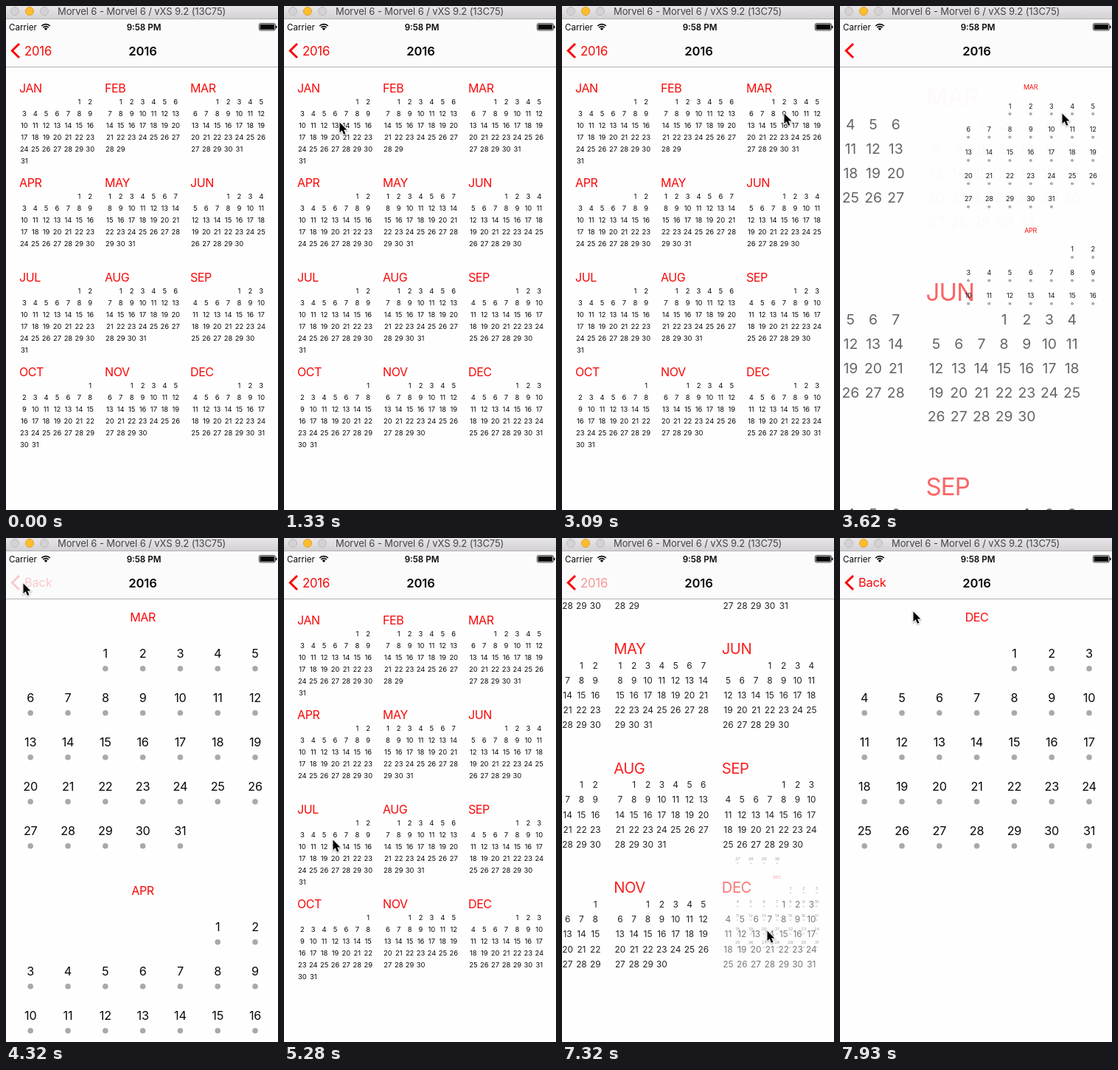
Animation, 369 px wide and 682 px high, one loop 8000 ms. Source, as an HTML page with a canvas:

```html
<!DOCTYPE html>
<html lang="en">
<head>
<meta charset="utf-8">
<title>Year calendar</title>
<style>
  html, body { margin: 0; width: 100%; height: 100%; overflow: hidden; background: #fefefe; }
  canvas { display: block; width: 369px; height: 682px; }
</style>
</head>
<body>
<canvas id="stage"></canvas>
<script>
const W = 369, H = 682, LOOP = 8000, STEP = 87.7, ZOOM = 410, FADE = 200;
const TOP = 18, NAV_BOTTOM = 82;
const RED = '#f80808', INK = '#080808', PAPER = '#fefefe';
const FONT = 'Inter, Roboto, sans-serif';

const canvas = document.getElementById('stage');
const ctx = canvas.getContext('2d');
const ratio = window.devicePixelRatio || 1;
canvas.width = W * ratio;
canvas.height = H * ratio;

const names = 'JAN FEB MAR APR MAY JUN JUL AUG SEP OCT NOV DEC'.split(' ');
const months = names.map((name, i) => {
  const first = new Date(2016, i, 1).getDay();
  const days = new Date(2016, i + 1, 0).getDate();
  return { name, first, days, rows: Math.ceil((first + days) / 7) };
});

// Each visit opens a month at "open"; the back button is pressed at "back".
const visits = [
  { open: 1330, back: 2300, month: 0 },
  { open: 3440, back: 4320, month: 2 },
  { open: 5200, back: 6080, month: 6 },
  { open: 7230, back: Infinity, month: 11 }
];
const PRESS = 60;
const bursts = [710, ...visits.flatMap(v => [v.open, v.back])].filter(isFinite);

// time, x, y of the pointer tip
const pointerPath = [
  [710, 24, 158], [890, 75, 157], [1590, 75, 157], [1680, 72, 142], [2110, 24, 61],
  [2560, 24, 61], [3085, 301, 145], [3780, 301, 145], [4225, 23, 61],
  [4490, 23, 61], [4925, 66, 408], [5460, 66, 408], [5900, 57, 74], [5985, 28, 63],
  [6340, 28, 63], [6865, 278, 531], [7490, 278, 531], [7930, 99, 99]
];

const clamp = v => Math.max(0, Math.min(1, v));
const lerp = (a, b, p) => a + (b - a) * p;

// cubic-bezier(.42, 0, .58, 1)
function easeInOut(x) {
  x = clamp(x);
  let lo = 0, hi = 1;
  for (let i = 0; i < 22; i++) {
    const u = (lo + hi) / 2, v = 1 - u;
    if (1.26 * u * v * v + 1.74 * u * u * v + u * u * u < x) lo = u; else hi = u;
  }
  return lo * lo * (3 - 2 * lo);
}

function stepped(t) {
  const start = bursts.filter(b => b <= t).pop();
  return start === undefined ? t : start + Math.floor((t - start + 2) / STEP) * STEP;
}

function text(str, x, y, size, color, align = 'center', weight = 400, tracking = 0) {
  ctx.font = `${weight} ${size}px ${FONT}`;
  ctx.letterSpacing = tracking + 'px';
  ctx.textAlign = align;
  ctx.fillStyle = color;
  ctx.fillText(str, x, y + size * 0.364);
}

function circle(x, y, r, fill, stroke) {
  ctx.beginPath();
  ctx.arc(x, y, r, 0, Math.PI * 2);
  ctx.fillStyle = fill;
  ctx.fill();
  if (stroke) {
    ctx.lineWidth = 1;
    ctx.strokeStyle = stroke;
    ctx.stroke();
  }
}

function eachDay(month, draw) {
  for (let day = 1; day <= month.days; day++) {
    const slot = month.first + day - 1;
    draw(day, slot % 7, Math.floor(slot / 7));
  }
}

function drawYear(alpha = 1, target = -1, p = 0, cellAlpha = 1) {
  ctx.save();
  if (p > 0) {
    const col = target % 3, row = Math.floor(target / 3), s = 1 + 2.81 * p;
    ctx.translate(184.5 - 538 * p * (col - 1), 341 - 450 * p * (row - 1.5));
    ctx.scale(s, s);
    ctx.translate(-184.5, -341);
  }
  months.forEach((month, i) => {
    const x = 18 + 116 * (i % 3), y = 111.5 + 128 * Math.floor(i / 3);
    ctx.globalAlpha = alpha * (i === target ? cellAlpha : 1);
    text(month.name, x, y, 16, RED, 'left', 400, -0.4);
    eachDay(month, (day, c, r) => text(day, x + 6.8 + 14.9 * c, y + 18 + 16 * r, 9.4, INK));
  });
  ctx.restore();
}

function drawMonthList(target, p, alpha) {
  const cellX = 18 + 116 * (target % 3), cellY = 90 + 128 * Math.floor(target / 3);
  ctx.save();
  ctx.globalAlpha = alpha;
  ctx.translate(lerp(cellX, 0, p), lerp(cellY, TOP, p));
  ctx.scale(lerp(0.285, 1, p), lerp(0.236, 1, p));
  ctx.beginPath();
  ctx.rect(0, 0, W, H - TOP);
  ctx.clip();
  const height = month => 70 + 60 * month.rows;
  let i = target, y = 89.5;
  if (i > 0) y -= height(months[--i]);
  for (; i < 12 && y < H; y += height(months[i++])) {
    text(months[i].name, 185.5, y, 16, RED, 'center', 400, -0.4);
    eachDay(months[i], (day, c, r) => {
      const dx = 33.2 + 50.8 * c, dy = y + 49 + 60 * r;
      text(day, dx, dy, 16.2, INK, 'center', 400, -0.2);
      circle(dx, dy + 20.2, 3.8, '#a9a9a9');
    });
  }
  ctx.restore();
}

function drawBackButton(visit, t) {
  let yearAlpha = 1, backAlpha = 0, arrowAlpha = 1;
  if (visit) {
    const out = d => clamp(1 - d / 150), into = d => clamp((d - 200) / 300);
    const opened = t - visit.open, left = t - visit.back - PRESS;
    if (left >= 0) {
      yearAlpha = into(left);
      backAlpha = out(left);
    } else {
      yearAlpha = out(opened);
      backAlpha = into(opened);
      if (t >= visit.back) arrowAlpha = backAlpha = 0.2;
    }
  }
  ctx.save();
  ctx.globalAlpha = arrowAlpha;
  ctx.strokeStyle = RED;
  ctx.lineWidth = 3;
  ctx.beginPath();
  ctx.moveTo(18, 51);
  ctx.lineTo(8.3, 60.5);
  ctx.lineTo(18, 70);
  ctx.stroke();
  ctx.globalAlpha = yearAlpha;
  text('2016', 25, 60.5, 16.7, RED, 'left', 400, -0.2);
  ctx.globalAlpha = backAlpha;
  text('Back', 25, 60.5, 16.4, RED, 'left', 400, -0.2);
  ctx.restore();
}

function drawStatus() {
  text('Carrier', 4, 28.5, 11.6, INK, 'left');
  text('9:58 PM', 187, 28.5, 11.6, INK, 'center', 600);
  ctx.strokeStyle = ctx.fillStyle = INK;
  ctx.lineWidth = 1.7;
  for (const r of [5.2, 8.2]) {
    ctx.beginPath();
    ctx.arc(54, 32.8, r, -Math.PI * 0.75, -Math.PI * 0.25);
    ctx.stroke();
  }
  ctx.beginPath();
  ctx.moveTo(54, 33);
  ctx.arc(54, 33, 3.2, -Math.PI * 0.75, -Math.PI * 0.25);
  ctx.fill();
  ctx.lineWidth = 0.8;
  ctx.beginPath();
  ctx.roundRect(343.4, 23.6, 22, 9.4, 2);
  ctx.stroke();
  ctx.fillRect(344.6, 24.8, 19.6, 7);
  ctx.fillRect(366, 26.7, 1.5, 3.4);
}

function drawWindowBar() {
  const shade = ctx.createLinearGradient(0, 0, 0, TOP);
  shade.addColorStop(0, '#e8e6e8');
  shade.addColorStop(1, '#d2d0d2');
  ctx.fillStyle = shade;
  ctx.fillRect(0, 0, W, TOP);
  ctx.fillStyle = '#b4b2b4';
  ctx.fillRect(0, TOP - 1, W, 1);
  circle(12, 7, 5.5, '#d4d2d4', '#bcbabc');
  circle(32, 7, 5.5, '#fdbd2e', '#dfa023');
  circle(52, 7, 5.5, '#d4d2d4', '#bcbabc');
  text('Morvel 6 - Morvel 6 / vXS 9.2 (13C75)', 70, 7.5, 13, '#454345', 'left', 400, -0.1);
}

function drawPointer(t) {
  if (t < pointerPath[0][0]) return;
  let i = 0;
  while (i < pointerPath.length - 2 && t > pointerPath[i + 1][0]) i++;
  const [t0, x0, y0] = pointerPath[i], [t1, x1, y1] = pointerPath[i + 1];
  const raw = clamp((t - t0) / (t1 - t0)), p = raw * raw * (3 - 2 * raw);
  ctx.save();
  ctx.translate(lerp(x0, x1, p), lerp(y0, y1, p));
  const arrow = new Path2D('M.5 .5V14.2L3.7 11.3L6 16.7L8.4 15.7L6.1 10.5H10.4Z');
  ctx.shadowColor = 'rgba(0,0,0,.35)';
  ctx.shadowBlur = 2 * ratio;
  ctx.shadowOffsetY = ratio;
  ctx.lineWidth = 2;
  ctx.strokeStyle = '#fff';
  ctx.stroke(arrow);
  ctx.shadowColor = 'transparent';
  ctx.fillStyle = '#000';
  ctx.fill(arrow);
  ctx.restore();
}

function drawContent(visit, t) {
  if (!visit) return drawYear();
  const left = t - visit.back - PRESS;
  if (left >= 0) {
    const p = easeInOut(left / ZOOM);
    drawYear(p);
    drawMonthList(visit.month, 1 - p, 1 - p);
  } else {
    // The tapped cell dissolves into its month while the whole year zooms away.
    const opened = t - visit.open;
    const p = easeInOut(opened / ZOOM), swap = easeInOut(opened / FADE);
    drawYear(1 - p, visit.month, p, 1 - swap);
    drawMonthList(visit.month, p, swap);
  }
}

function render(now) {
  const t = stepped(now % LOOP);
  const visit = visits.filter(v => v.open <= t).pop();
  ctx.setTransform(ratio, 0, 0, ratio, 0, 0);
  ctx.fillStyle = PAPER;
  ctx.fillRect(0, 0, W, H);
  drawContent(visit, t);
  ctx.fillStyle = '#fbfbfb';
  ctx.fillRect(0, TOP, W, NAV_BOTTOM - TOP);
  ctx.fillStyle = '#b0b0b0';
  ctx.fillRect(0, NAV_BOTTOM, W, 1);
  drawStatus();
  text('2016', 185.5, 60.5, 16.6, INK, 'center', 600, -0.1);
  drawBackButton(visit, t);
  drawWindowBar();
  drawPointer(t);
}

let origin;
function tick(now) {
  origin ??= now;
  render(now - origin);
  requestAnimationFrame(tick);
}
render(0);
requestAnimationFrame(tick);
</script>
</body>
</html>
```
